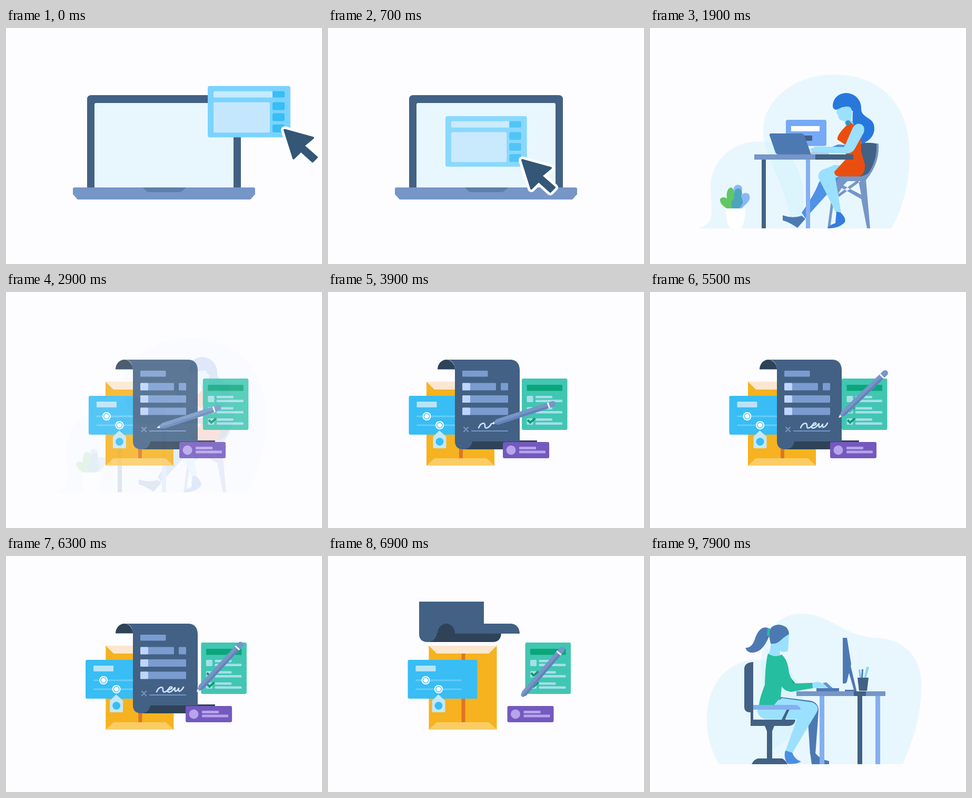
An HTML page for the animation above (8000 ms loop, 600 by 450 pixels).

```html
<!DOCTYPE html>
<html lang="en">
<head>
<meta charset="utf-8">
<title>Signing online</title>
<style>
html,body{margin:0;width:100%;height:100%;overflow:hidden;background:#fdfcff}
svg{display:block;width:100vw;height:100vh}
.navy{fill:#426184}.ink{fill:#2e4358}.steel{fill:#7696c8}.denim{fill:#4d79b3}
.soft{fill:#84aff0}.sky{fill:#38bdf4}.skin{fill:#9be0ff}.blob{fill:rgba(200,237,250,.4)}
.line{fill:none;stroke-linecap:round;stroke-linejoin:round}
</style>
</head>
<body>
<svg viewBox="0 0 600 450">
<defs>
  <clipPath id="sheetClip"><rect id="sheetCut" x="0" width="600" height="450"/></clipPath>
  <clipPath id="textClip"><rect id="textCut" x="241" y="129" width="123" height="160"/></clipPath>
</defs>

<g id="laptop">
  <path class="navy" d="M154 304V136q0-8 8-8H438q8 0 8 8V304z"/>
  <path fill="#e8f7fe" d="M168 304V146q0-3 3-3H429q3 0 3 3V304z"/>
  <path class="steel" d="M130 304H470q3 0 3 3V317L464 327H136L127 317V307q0-3 3-3z"/>
  <path fill="#5d7fae" d="M260 304H342L336 310Q333 313 327 313H274Q268 313 265 310z"/>
  <g id="widget">
    <rect width="157" height="98" rx="4" fill="#7ad3ff"/>
    <rect x="11" y="10" width="113" height="12" rx="2" fill="#c6ebff"/>
    <rect x="11" y="31" width="107" height="58" rx="3" fill="#c4e7fd"/>
    <path class="sky" d="M123 10h21q2 0 2 2v8q0 2-2 2h-21z"/>
    <g id="keys" class="sky"></g>
  </g>
  <g id="cursor" stroke-linejoin="round">
    <path id="arrow" d="M2 2L56 17L38 32L63 54L55 62L33 42L19 56z" fill="#fff" stroke="#fff" stroke-width="14"/>
    <path d="M2 2L56 17L38 32L63 54L55 62L33 42L19 56z" fill="#345777" stroke="#345777" stroke-width="4"/>
  </g>
</g>

<g id="homeDesk">
  <path class="blob" d="M92 382C124 374 117 350 115 310C112 253 160 210 220 217C266 222 296 280 291 340Q289 370 283 382z"/>
  <path class="blob" d="M458 382C482 342 493 290 493 240C493 148 440 89 350 89C270 89 215 140 215 195C215 250 258 290 270 382z"/>
  <g id="plant">
    <path fill="#62c665" d="M156 344H146Q132 336 133 326Q138 320 146 325Q144 308 153 304Q162 306 161 322L168 344z"/>
    <circle cx="167" cy="307" r="8" fill="#8bb7fa"/>
    <path fill="#8bb7fa" d="M160 344L172 319Q181 311 188 317Q193 327 181 337L174 344z"/>
    <path fill="#4aa6bd" d="M157 344Q150 333 160 325Q158 306 168 306Q178 308 173 322Q181 334 169 344z"/>
    <path fill="#fff" d="M144 344H181Q180 374 172 382H153Q144 374 144 344z"/>
  </g>
  <path class="navy" d="M398 220Q416 217 433 221Q434 254 411 288H390L402 260z"/>
  <path class="line" d="M432 222Q434 258 409 288" stroke="#7696c8" stroke-width="4"/>
  <path class="steel" d="M352 283H400Q410 281 415 276L410 290L418 382H412L401 326L364 305L349 330L342 382H337L349 292zM356 318L391 292H400L359 322zM367 300L401 318L396 292H375z" fill-rule="evenodd"/>
  <g id="dialog">
    <rect x="258" y="175" width="77" height="50" rx="4" fill="#76a9f6"/>
    <path fill="#fff" d="M268 187h54v10h-54z"/>
    <rect class="navy" x="282" y="205" width="26" height="10" rx="1"/>
  </g>
  <path fill="#4f91e6" d="M333 275L359 286L338 315L295 363L288 352Q312 318 320 296z"/>
  <path class="denim" d="M252 357Q270 364 288 358L295 364L280 381Q264 370 252 367z"/>
  <path class="skin" d="M351 261L385 264V283H358L352 286L363 353L353 352L320 286Q318 272 333 268z"/>
  <path fill="#347cdf" d="M354 350L362 352Q373 363 370 370Q360 382 338 382Q338 377 352 372z"/>
  <path fill="#2878dc" d="M347 150C347 133 359 124 373 124C391 125 401 139 401 152C400 171 420 169 425 184C430 206 414 216 403 221L384 194L385 158L365 151Q350 161 347 150z"/>
  <path class="skin" d="M355 156Q370 147 380 151Q386 157 382 175L388 186L372 188L369 177Q358 178 357 166L354 162z"/>
  <path fill="#ea4e0f" d="M380 179L371 188Q354 205 356 213L373 224L371 251L350 274Q350 283 360 283H396Q409 280 408 260L401 236L400 195z"/>
  <circle cx="376" cy="181" r="5" fill="#3c92bc"/>
  <path fill="#4f91e6" d="M357 222L371 223L366 230L340 229z"/>
  <path class="denim" d="M230 201H287Q291 201 293 205L306 241H243Q240 241 238 237L227 205Q226 201 230 201z"/>
  <path fill="#b7c7e4" d="M306 236h34v6h-34z"/>
  <path class="skin" id="arm" d="M385 190Q392 179 402 184Q409 189 406 199L389 230Q384 239 374 239L331 238L307 236L304 231L314 226L369 227z"/>
  <path class="steel" d="M198 241h116v10h-116z"/>
  <path class="navy" d="M314 241h72v10h-72zM212 251h8v131h-8z"/>
  <path class="soft" d="M296 251h8v131h-8z"/>
</g>

<g id="papers">
  <g id="envelope">
    <path fill="#f6b21f" d="M0 171h129v160H0z"/>
    <path fill="#fbe7d0" d="M0 171H129L114 186H15z"/>
    <path fill="#facc66" d="M15 317H114L129 331H0z"/>
    <path fill="#df7426" d="M62 186h7v131h-7z"/>
  </g>
  <g id="sliders">
    <rect class="sky" width="132" height="74" rx="3" y="198"/>
    <rect x="15" y="209" width="38" height="11" rx="1" fill="#b8e4f8"/>
    <path class="line" d="M16 237H101M16 254H101" stroke="#68cdf7" stroke-width="3"/>
    <g id="knobs"></g>
    <path fill="#c4e8f7" d="M58 264L71 276V296q0 2-2 2H48q-2 0-2-2V276z"/>
    <circle class="sky" cx="58.500" cy="285.500" r="7.500"/>
  </g>
  <g id="checklist">
    <rect y="165" width="86.500" height="98" rx="3" fill="#41c6b2"/>
    <rect x="9.500" y="177" width="67.500" height="11.500" rx="1" fill="#0ba67c"/>
    <g id="rows" fill="#a6dfe9"></g>
    <path class="line" id="check" d="M11 223l5 5l9-8" stroke="#0a9c75" stroke-width="4" style="stroke-linecap:butt;stroke-linejoin:miter"/>
    <path class="line" d="M11 244l5 5l9-8" stroke="#0a9c75" stroke-width="4" style="stroke-linecap:butt;stroke-linejoin:miter"/>
  </g>
  <g id="contract">
    <g clip-path="url(#sheetClip)">
      <g id="sheet">
        <path class="navy" d="M241 50H364V284H274Q273 300 257 300Q241 300 241 284z"/>
        <path class="ink" d="M274 283H397Q396 300 381 300H257Q273 299 274 283z"/>
      </g>
    </g>
    <path class="navy" id="front"/>
    <path class="ink" d="M208 147.500A16.500 18.500 0 0 1 241 147.500z"/>
    <g clip-path="url(#textClip)">
      <g id="form">
        <g id="fields" fill="#7b9cd0"></g>
        <path class="line" d="M258 258l8 8m0-8l-8 8M273 265H341" stroke="#7797c8" stroke-width="2.200"/>
        <path class="line" id="ink" stroke="#cfe2ff" stroke-width="2.600" d="M286 259C290 249 298 248 298 254C297 264 306 258 309 253C312 247 318 250 314 253C304 256 306 261 312 259C317 258 319 251 321 251C319 261 324 259 328 252C326 261 332 259 337 250"/>
      </g>
    </g>
  </g>
  <g id="badge">
    <rect y="286" width="88" height="31" rx="3" fill="#7459be"/>
    <g fill="#b6a4ec"><circle cx="15.500" cy="301.500" r="9"/>
    <rect x="31" y="295" width="32" height="5" rx="1"/><rect x="31" y="302.500" width="50" height="5" rx="1"/></g>
  </g>
  <g id="pen">
    <path class="steel" d="M3 -1L13 -5.500H123a5.500 5.500 0 0 1 0 11H13L3 1z"/>
    <path fill="#6483b8" d="M3 1H113V5.500H13z"/>
    <path fill="#f4f7ff" d="M0 0L6 -2.500V2.500zM113 -5.500h3v11h-3z"/>
  </g>
</g>

<g id="officeDesk">
  <path class="blob" d="M131 397C112 362 108 340 108 309C108 243 150 198 203 198C265 198 302 250 290 307C279 355 225 360 214 397z"/>
  <path class="blob" d="M480 397C502 345 515 300 515 246C515 188 478 158 430 156C367 154 342 110 288 110C242 110 211 149 211 203C211 270 240 310 214 397z"/>
  <path class="denim" d="M247 269L305 276Q321 280 320 296L314 378L304 378L299 300L240 290z"/>
  <path class="denim" d="M304 375L314 376Q323 388 340 391V397H307z"/>
  <path class="navy" d="M196 202V298H188Q179 297 179 288V214Q180 203 196 202zM191 298H196V312H276Q275 324 262 324H236L232 334V386H250Q257 388 261 397H193Q197 388 205 386H222V334L218 324H191zM253 312L260 293H265L257 312z"/>
  <path class="skin" d="M206 284H236L250 271L308 279Q324 286 316 299L270 376L257 372L279 311H220Q204 309 204 291z"/>
  <path class="navy" d="M250 312L260 292H265L256 312z"/>
  <path fill="#4a8fe4" d="M257 371L270 375Q275 388 287 392Q276 398 261 396Q253 384 257 371z"/>
  <path class="denim" d="M226 138C211 131 203 147 199 159Q193 176 181 175Q185 186 197 184C214 182 222 163 227 151z"/>
  <path class="skin" d="M229 158L264 146L262 181Q254 185 247 181Q245 190 252 194L222 193Q231 181 229 158z"/>
  <path class="denim" d="M226 152Q225 131 246 131Q263 133 264 149Q255 154 249 160Q240 169 229 167z"/>
  <path fill="#26bea0" d="M223 138h5l-1 14h-5z"/>
  <path fill="#0ba67c" d="M256 218L276 243L310 242L309 252L272 255z"/>
  <path fill="#26bea0" d="M224 186Q238 195 250 188Q262 198 264 223L272 243L310 243L309 252L269 259Q256 258 250 249L248 270L236 284H207Q208 271 218 246Q219 204 224 186z"/>
  <path class="soft" d="M196 284H277Q285 285 286 293H196z"/>
  <g id="hand"><path class="skin" d="M308 242Q324 237 332 247L337 253L327 251L309 252z"/><path fill="#5b92dc" d="M328 242L335 241L347 252H338z"/></g>
  <path class="denim" d="M316 252h43v6h-43zM366 156H374L382 206L374 239Q373 243 370 243H366zM380 205L392 256V258H370V255H387L377 220z"/>
  <path fill="#8cc2fa" d="M396 217l3-1l3 18h-4z"/><path class="denim" d="M402 216h3l-1 18h-3z"/><path fill="#86d8fa" d="M411 211l5 1l-6 22h-4z"/>
  <path class="navy" d="M394 232H415L412 257H397z"/>
  <path class="steel" d="M278 258h169v9h-169z"/>
  <path class="navy" d="M387 258h23v9h-23zM394 267h9v130h-9z"/>
  <path class="soft" d="M322 267h9v130h-9zM428 267h9v130h-9z"/>
</g>
</svg>
<script>
const el = id => document.getElementById(id);
const rect = (x, y, w, h, fill, r = 1.5) =>
  `<rect x="${x}" y="${y}" width="${w}" height="${h}" rx="${r}"${fill ? ` fill="${fill}"` : ''}/>`;
const clamp = v => Math.max(0, Math.min(1, v));
const part = (t, a, b) => clamp((t - a) / (b - a));
const ease = p => p * p * (3 - 2 * p);
const mix = (a, b, p) => a + (b - a) * p;
const show = (id, v) => { el(id).style.opacity = v; };
const move = (id, x, y = 0, extra = '') => el(id).setAttribute('transform', `translate(${x} ${y})${extra}`);

// Eased value through [time, value] stops
function track(t, ...stops) {
  let [t0, v0] = stops[0];
  for (const [t1, v1] of stops) {
    if (t < t1) return mix(v0, v1, ease(part(t, t0, t1)));
    [t0, v0] = [t1, v1];
  }
  return v0;
}

el('keys').innerHTML = [31, 52, 73.5].map(y => rect(123, y, 23, 15, '', 3)).join('');
el('knobs').innerHTML = [[34, 237], [58.5, 254]].map(([x, y]) =>
  `<circle cx="${x}" cy="${y}" r="8" fill="#fff"/><circle cx="${x}" cy="${y}" r="5.3" fill="#fff" stroke="#38bdf4" stroke-width="1.4"/>`).join('');
el('rows').innerHTML = [198, 219.5, 241].map(y =>
  rect(9.5, y, 12, 12) + rect(26, y, 32, 4.5) + rect(26, y + 7.5, 51, 4.5)).join('');
el('fields').innerHTML = rect(255, 150, 48.5, 11.5) + rect(328, 173.5, 14, 14) +
  [[173.5, 64], [197, 87], [220.5, 87]].map(([y, w]) => rect(255, y, w, 14) + rect(255, y, 15, 14, '#bed5fc')).join('');

const ink = el('ink'), inkLength = ink.getTotalLength();
ink.style.strokeDasharray = inkLength + ' ' + (inkLength + 10);

function drawLaptop(t) {
  const p = ease(part(t, 0, 700)), nudge = 9 * ease(part(t, 700, 900));
  const x = mix(383, 223, p), y = mix(110.5, 168, p);
  move('widget', x, y, ` scale(${mix(1, .985, p)})`);
  show('widget', mix(1, .86, p));
  move('cursor', x + 144 + nudge, y + 82 + nudge);
}

function drawPapers(t) {
  move('envelope', track(t, [2800, 189], [3900, 187], [5500, 186], [6900, 191.5]));
  move('sliders', track(t, [2800, 157], [3900, 153.5], [4700, 148], [5500, 150.5], [6900, 151.5]));
  move('checklist', track(t, [2800, 374], [3900, 368], [5500, 364], [6900, 374.5]));
  move('badge', track(t, [2800, 329], [3900, 332], [5500, 342], [6900, 340.5]));
  show('check', part(t, 5350, 5650));

  const written = track(t, [3500, 0], [3900, .35], [5200, 1]) * inkLength;
  ink.style.strokeDashoffset = inkLength - written;
  show('ink', written > 0 ? 1 : 0);
  const tip = ink.getPointAtLength(written);
  const lift = ease(part(t, 5200, 5500)), away = ease(part(t, 5500, 6900));
  const px = mix(mix(tip.x, 358, lift), 364, away), py = mix(mix(tip.y, 240, lift), 272, away);
  move('pen', px, py, ` rotate(${mix(mix(-18, -44, lift), -49.5, away)})`);

  // The sheet rolls up, then leaves through the top
  const roll = ease(part(t, 6350, 6900)), exit = part(t, 6900, 7150);
  const low = mix(285, 148, roll);
  move('sheet', -68 * roll, -136 * roll);
  el('sheetCut').setAttribute('y', mix(roll ? 129 : 148, 87, roll));
  el('front').setAttribute('d', `M225 129H347Q363 130 364 148V${low}H241V147.500Q240 130 225 129z`);
  el('textCut').setAttribute('height', Math.max(0, low - 129));
  show('form', 1 - part(t, 6400, 6800));
  move('contract', 0, -69 * exit * exit);
}

function draw(t) {
  const scenes = ['laptop', 'homeDesk', 'papers', 'officeDesk'];
  const cuts = [[920, 1220], [2600, 2950], [6980, 7350]];
  scenes.forEach((id, i) => {
    const enter = i ? part(t, ...cuts[i - 1]) : 1, leave = i < 3 ? part(t, ...cuts[i]) : 0;
    show(id, enter * (1 - leave));
    el(id).style.display = enter * (1 - leave) ? '' : 'none';
  });
  drawLaptop(t);
  drawPapers(t);
  show('dialog', part(t, 1300, 1700));
  move('arm', 0, .5 * Math.sin((t - 1900) / 90));
  move('hand', 0, .6 * Math.sin((t - 7900) / 80));
}

function frame() {
  draw(performance.now() % 8000);
  requestAnimationFrame(frame);
}
frame();
</script>
</body>
</html>
```
